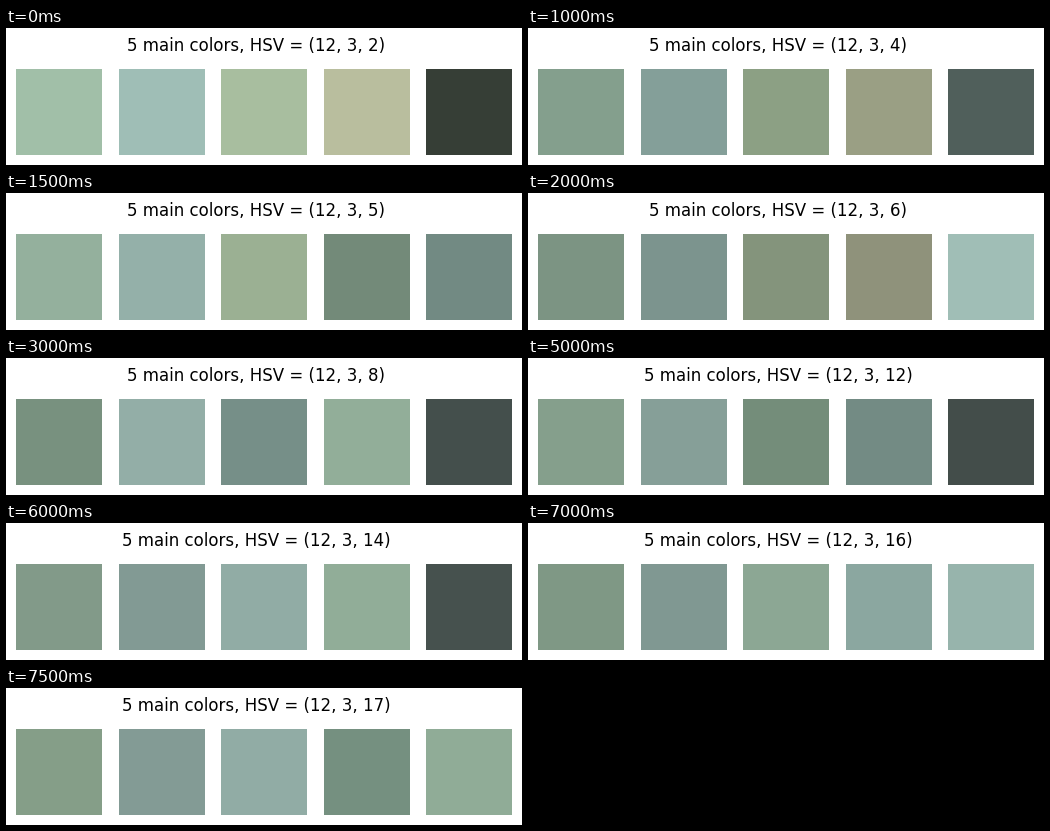
Recreate the animation shown at these times as a matplotlib script. Size 516 by 137 pixels, loop 8 s.

```python
import matplotlib.pyplot as plt
from matplotlib.animation import FuncAnimation
from matplotlib.patches import Rectangle

W, H, DPI = 516, 137, 100
SIDE, TOP = 86, 41
LEFTS = (10, 113, 215, 318, 420)
FIRST_BINS = 2

# Five dominant colors for each number of value bins, starting at FIRST_BINS
PALETTES = [row.split() for row in (
    "a1bfa8 9fbeb6 a8be9f b9be9e 363e36",
    "748c7b 748c85 7c8d75 878b73 abcbc2",
    "849f8d 849f99 8ca084 9a9f84 505f5b",
    "94b09d 94b0a9 9bb093 738a79 728a83",
    "7c9483 7c948e 84947c 8f927b a0beb6",
    "809887 80988f 889880 738977 6f867f",
    "78917f 93aea7 768f88 92ae99 444f4c",
    "829c89 839d96 859b80 9ab7b0 424c49",
    "8ba694 8ba59e 738d7b 738c85 92a68a",
    "7f9886 809892 91aca5 91ad98 46514e",
    "859f8c 869f98 748d7a 738b84 434d4a",
    "7d9483 7c948d 8ca794 8ba7a0 92a78b",
    "829a89 829a94 91aca5 91ad98 46514e",
    "869f8e 869f99 7a9280 79918a 95b2aa",
    "7f9885 809892 8ca794 8ba7a0 97b4ac",
    "859e88 839b95 91aca5 759080 90ac97",
)]

fig = plt.figure(figsize=(W / DPI, H / DPI), dpi=DPI, facecolor="white")
ax = fig.add_axes([0, 0, 1, 1])
ax.set(xlim=(0, W), ylim=(H, 0))
ax.axis("off")

swatches = [ax.add_patch(Rectangle((x, TOP), SIDE, SIDE, lw=0)) for x in LEFTS]
title = ax.text(250.3, 23, "", fontsize=12, family="DejaVu Sans",
                ha="center", va="baseline")


def update(i):
    title.set_text(f"5 main colors, HSV = (12, 3, {FIRST_BINS + i})")
    for swatch, color in zip(swatches, PALETTES[i]):
        swatch.set_facecolor("#" + color)
    return [*swatches, title]


anim = FuncAnimation(fig, update, frames=len(PALETTES), interval=500,
                     repeat=True, repeat_delay=0)
plt.show()
```
